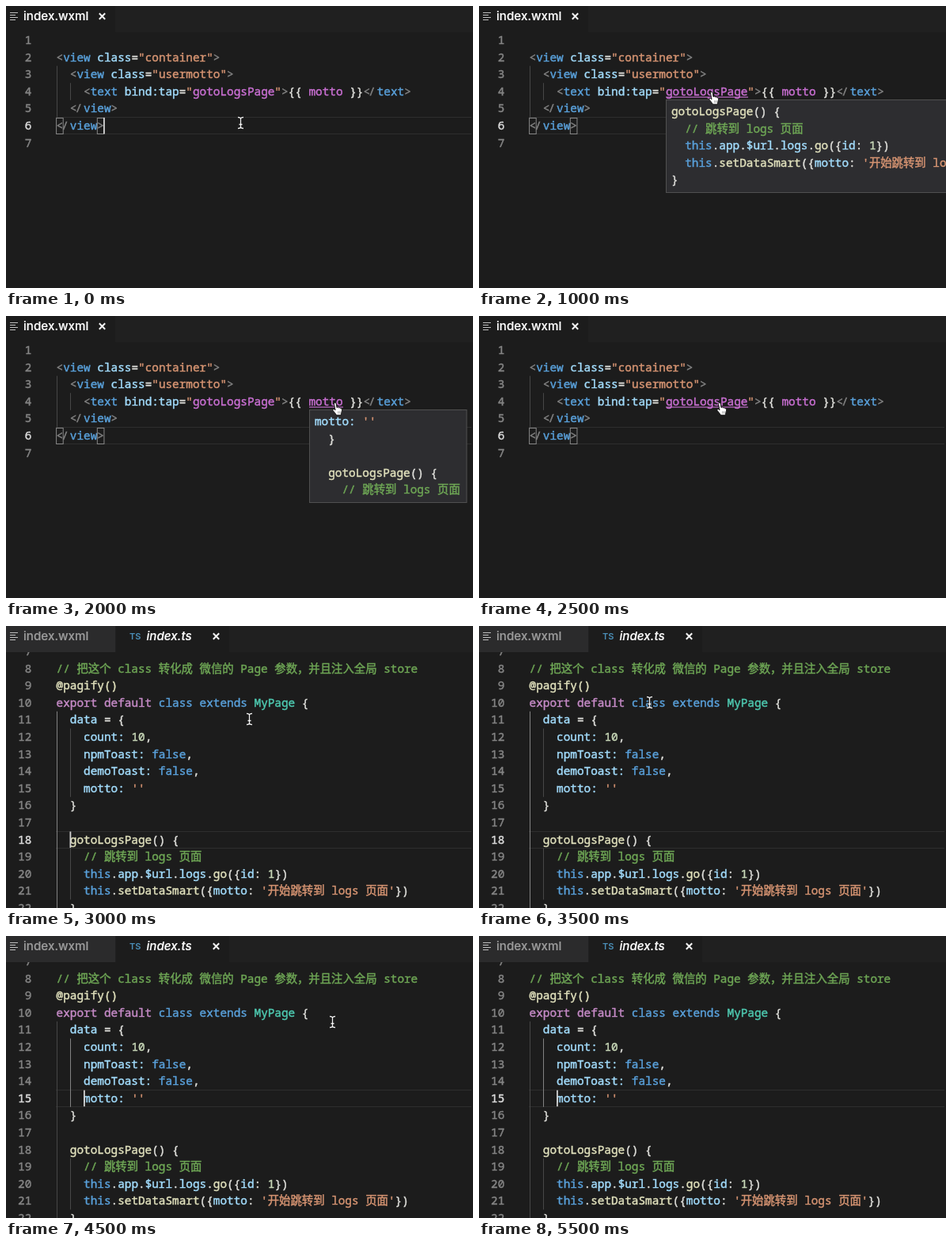
An HTML page for the animation above (6 s loop, 590 by 356 pixels).

```html
<!DOCTYPE html>
<html lang="en">
<head>
<meta charset="utf-8">
<title>Go to definition</title>
<style>
html, body { margin: 0; width: 100%; height: 100%; overflow: hidden; background: #1c1c1c; }
svg { display: block; width: 590px; height: 356px; }
text { white-space: pre; }
.code { font: 500 14.366px "Noto Sans Mono", "Noto Sans CJK SC", "Noto Sans CJK", monospace; font-variant-ligatures: none; stroke-width: .45px; }
.tab { font: 500 15.2px Inter, sans-serif; stroke-width: .2px; }
.it { font-style: italic; }
.ts { font: 600 11px Inter, sans-serif; stroke-width: 0; }
</style>
</head>
<body>
<svg id="stage" viewBox="0 0 590 356"></svg>
<script>
const CH = 8.62, ROW = 21.6, LEFT = 63.6;
const COLORS = {
  w: '#e0e0dc', g: '#838383', b: '#59a0da', a: '#a2dcfc', s: '#d69472', p: '#c96fd2',
  k: '#c58ac6', c: '#6ea655', f: '#e0e0bc', t: '#4ec9b0', n: '#c8d8b8'
};

// Each token is a colour key followed by its text; tokens are split by "|".
const WXML = [
  '',
  'g<|bview|w |aclass|w=|s"container"|g>',
  'w  |g<|bview|w |aclass|w=|s"usermotto"|g>',
  'w    |g<|btext|w |abind:tap|w=|s"|pgotoLogsPage|s"|g>|w{{ |pmotto|w }}|g</|btext|g>',
  'w  |g</|bview|g>',
  'g</|bview|g>',
  ''
];
const METHOD = [
  'fgotoLogsPage|w() {',
  'w  |c// 跳转到 logs 页面',
  'w  |bthis|w.|aapp|w.|a$url|w.|alogs|w.|fgo|w({|aid|w: |n1|w})',
  "w  |bthis|w.|fsetDataSmart|w({|amotto|w: |s'开始跳转到 logs 页面'|w})",
  'w}'
];
const TS = [
  '',
  'c// 把这个 class 转化成 微信的 Page 参数，并且注入全局 store',
  'f@pagify()',
  'kexport|w |kdefault|w |bclass|w |bextends|w |tMyPage|w {',
  'w  |adata|w = {',
  'w    |acount:|w |n10|w,',
  'w    |anpmToast:|w |bfalse|w,',
  'w    |ademoToast:|w |bfalse|w,',
  "w    |amotto:|w |s''",
  'w  }',
  '',
  ...METHOD.map(l => 'w  |' + l)
];
const POPUPS = {
  method: { x: 236, w: 444, lines: METHOD },
  motto: {
    x: 383, w: 198.5,
    lines: ["amotto:|w |s''", 'w  }', '', 'w  |fgotoLogsPage|w() {', 'w    |c// 跳转到 logs 页面']
  }
};
const LINKS = { method: [236, 104], motto: [383, 43] };

const STEP = 500;
const STEPS = [
  { line: 6, caret: 124, beam: [296, 147] },
  { line: 6, caret: 124, hand: [297, 116], link: 'method' },
  { line: 6, hand: [297, 116], link: 'method', popup: 'method' },
  { line: 6, hand: [419, 117], link: 'motto' },
  { line: 6, hand: [419, 117], link: 'motto', popup: 'motto' },
  { line: 6, hand: [307, 117], link: 'method' },
  { ts: true, line: 18, caret: 81.5, beam: [307, 117] },
  { ts: true, line: 18, beam: [215, 96] },
  { line: 4, caret: 307, beam: [402, 178], opened: true },
  { ts: true, line: 15, caret: 99, beam: [412, 108] },
  { ts: true, line: 15 },
  { ts: true, line: 15, caret: 99 }
];

const esc = s => s.replace(/&/g, '&amp;').replace(/</g, '&lt;');
const ink = color => `fill="${color}" stroke="${color}"`;
const rect = (x, y, w, h, fill, extra = '') =>
  `<rect x="${x}" y="${y}" width="${w}" height="${h}" fill="${fill}" ${extra}/>`;
const path = (d, stroke, width, extra = 'fill="none"') =>
  `<path d="${d}" stroke="${stroke}" stroke-width="${width}" ${extra}/>`;
const label = (x, y, cls, color, s, extra = '') =>
  `<text x="${x}" y="${y}" class="${cls}" ${ink(color)} ${extra}>${esc(s)}</text>`;

function codeLine(x, y, src) {
  if (!src) return '';
  let shift = 0;
  const spans = src.split('|').map(token => {
    const color = ink(COLORS[token[0]]), s = token.slice(1);
    const dx = shift ? ` dx="${shift}"` : '';
    shift = 0;
    // The closing-tag pair is set tight, as in a ligature font.
    if (s === '</') {
      shift = 2;
      return `<tspan ${color}${dx}>&lt;</tspan><tspan ${color} dx="-2">/</tspan>`;
    }
    return `<tspan ${color}${dx}>${esc(s)}</tspan>`;
  });
  return `<text class="code" x="${x}" y="${y}" xml:space="preserve">${spans.join('')}</text>`;
}

function tabs(s) {
  const on = '#1c1c1c', off = '#2b2b2c', bright = '#fff', dim = '#9c9c9c';
  const close = x => path(`M${x - 3.7} 9.3l7.4 7.4m0 -7.4l-7.4 7.4`, '#f4f4f4', 2);
  let out = rect(0, 0, 590, 33, '#202020') + rect(0, 0, 138, 33, s.ts ? off : on);
  out += path('M5 8.5h10M5 11.5h7M5 14.5h10M5 17.5h7', '#c0c0c0', 1.2);
  out += label(22, 18, 'tab', s.ts ? dim : bright, 'index.wxml');
  if (!s.ts) out += close(121.5);
  if (s.ts || s.opened) {
    out += rect(139, 0, 143, 33, s.ts ? on : off);
    out += label(156, 17, 'ts', '#4b8fb8', 'TS');
    out += label(177.5, 18, 'tab it', s.ts ? bright : dim, 'index.ts');
    if (s.ts) out += close(265.5);
  }
  return out;
}

function guides(s, top) {
  const bar = (x, from, to, active) =>
    rect(x, top(from), 1, (to - from + 1) * ROW, active ? '#828282' : '#474747');
  if (!s.ts) return bar(64, 3, 5) + bar(81, 4, 4, s.line === 4);
  return bar(64, 11, 22, s.line === 18) + bar(81, 12, 15, s.line === 15) +
    bar(81, 19, 21);
}

function popup({ x, w, lines }) {
  return rect(x + .5, 118.5, w, 117, '#2d2d30', 'stroke="#505050"') +
    lines.map((l, i) => codeLine(x + 7, 138 + i * ROW, l)).join('');
}

function beam([x, y]) {
  const d = 'M-3.5 -7Q0 -7 0 -5V5Q0 7 -3.5 7M3.5 -7Q0 -7 0 -5M0 5Q0 7 3.5 7M-2 2H2';
  return `<g transform="translate(${x + .5} ${y + .5})">${path(d, '#111', 3)}${path(d, '#f4f4f4', 1.3)}</g>`;
}

function hand([x, y]) {
  const d = 'M-4.5 -6.5q1.4 -2.2 2.7 0l.7 5q1.8 -1 2.5 .4q1.6 -.6 2.2 .7q1.9 -.3 2 1.5' +
    'q.2 3 -1.2 5v2h-6q-1.4 -2.6 -4.4 -5.8q-.7 -2.2 1.5 -1.8l1.5 1.5z';
  return `<g transform="translate(${x} ${y})">${path(d, '#111', .9, 'fill="#fff" stroke-linejoin="round"')}` +
    path('M.8 3.2v3M2.8 3.2v3M4.6 3.2v3', '#555', .6) + '</g>';
}

function draw(s) {
  const first = s.ts ? 7 : 1, base = s.ts ? 37 : 48;
  const baseline = n => base + (n - first) * ROW;
  const top = n => baseline(n) - 15.6;
  const y = top(s.line);
  let out = rect(0, 0, 590, 356, '#1c1c1c');
  out += path(`M63 ${Math.round(y) + .5}H588M63 ${Math.round(y + 20.6) + .5}H588`, '#2e2e2e', 1.2);
  out += guides(s, top);

  (s.ts ? TS : WXML).forEach((src, i) => {
    const n = first + i;
    out += label(32.3, baseline(n), 'code', n === s.line ? '#dcdcdc' : '#858585', String(n), 'text-anchor="end"');
    out += codeLine(LEFT, baseline(n), src);
  });

  if (s.line === 6) {
    for (const col of [0, 6])
      out += rect(LEFT + col * CH, 141.5, CH, 20, 'none', 'stroke="#888"');
  }
  if (s.caret) out += rect(s.caret - 1, y + .5, 1.8, 20.5, '#d0d0d0');
  if (s.link) out += rect(LINKS[s.link][0], 114.5, LINKS[s.link][1], 1.1, COLORS.p);
  if (s.popup) out += popup(POPUPS[s.popup]);
  out += tabs(s);
  if (s.beam) out += beam(s.beam);
  if (s.hand) out += hand(s.hand);
  return out;
}

const stage = document.getElementById('stage');
const start = performance.now();
let shown = -1;

function tick() {
  const i = Math.floor((performance.now() - start) / STEP) % STEPS.length;
  if (i !== shown) {
    stage.innerHTML = draw(STEPS[i]);
    shown = i;
  }
  requestAnimationFrame(tick);
}
tick();
</script>
</body>
</html>
```
